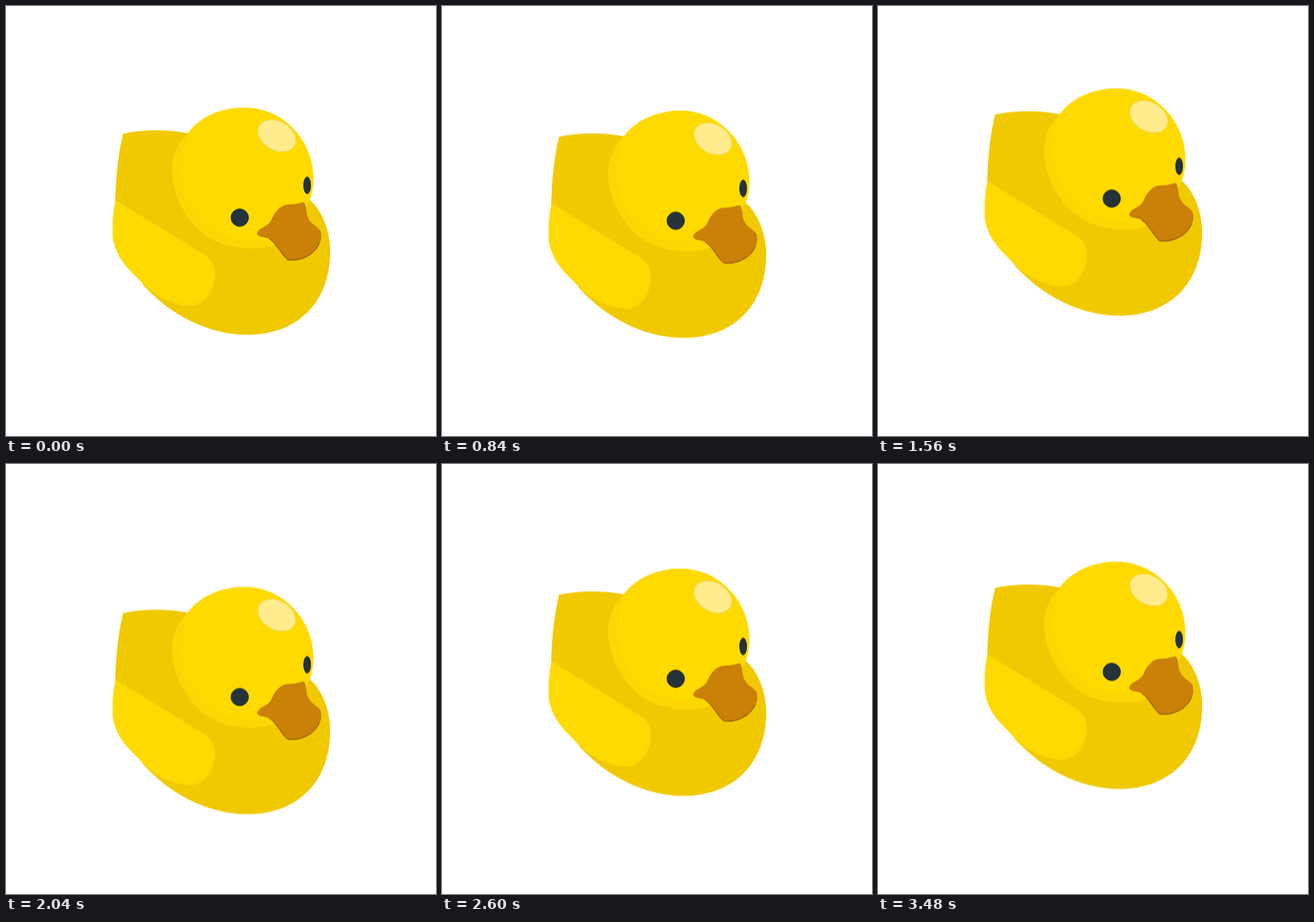
Recreate the animation shown at these times as an HTML page. Size 512 by 512 pixels, loop 3520 ms.

```html
<!DOCTYPE html>
<html lang="en">
<head>
<meta charset="utf-8">
<title>Bobbing duck</title>
<style>
  html, body { margin: 0; width: 100%; height: 100%; overflow: hidden; background: #fff; }
  svg { display: block; width: 100vw; height: 100vh; }
  .duck { animation: bob 1760ms steps(11) infinite; }
  .body { fill: #f0c900; }
  .rim { fill: #fbd803; }
  .light { fill: #ffda00; }
  .spot { fill: #ffec8c; stroke: #f3d650; stroke-width: .8; }
  .eye { fill: #25333b; stroke: #172126; stroke-width: 1; }
  .beak { fill: #cb8008; stroke: #c17507; stroke-width: 1; }
  .lip { fill: none; stroke: #80500f; stroke-width: .9; }

  /* straight-line bob, deeper on the way up */
  @keyframes bob {
    0%, 50%, 100% { transform: translateY(0); }
    25% { transform: translateY(40px); }
    75% { transform: translateY(-50px); }
  }
</style>
</head>
<body>
<svg viewBox="0 0 512 512">
  <g class="duck">
    <path class="body" d="M139.500 152 Q176 144.500 217 151.500 L362 231
      C376 243 386 268 386 292 C386 351 349 391.500 287 391.500
      C240 391 196 368 163 332 L130 234 Q131 186 139.500 152Z"/>
    <path class="rim" d="M130.500 231.500 L236 296 C246 302 249.500 311 249 322
      C247 342 236 355 222 357 C205 358 183 349 167 335 L149 316
      C138 305 127 289 127 269 Q127 246 130.500 231.500Z"/>
    <path class="light" d="M130.500 231.500 L236 296 C245 302 248 310 247.500 320
      C246 338 235 351 220 353 C203 354 182 346 166 333 L149 316
      C138 305 127 289 127 269 Q127 246 130.500 231.500Z"/>
    <path class="rim" d="M216 152.500 C231 131 258 121 284 121
      C330 121 366 160 366 206 Q366 224 357 240 L318 285
      C300 291 276 290 251 281 C219 266 197 228 197.500 193 Q199 168 216 152.500Z"/>
    <path class="light" d="M216 152.500 C231 131 258 121 284 121
      C330 121 366 160 366 206 C366 247 332 278 288 278
      C243 278 209 242 209 197 Q209 171 216 152.500Z"/>
    <ellipse class="spot" cx="322.500" cy="154.500" rx="24.200" ry="17.200" transform="rotate(30 322.500 154.500)"/>
    <circle class="eye" cx="278.300" cy="252" r="10.300"/>
    <ellipse class="eye" cx="358.600" cy="213.500" rx="4" ry="9.900"/>
    <path class="beak" d="M299.500 271 C301 264 311 264 316 256 C320 246 326 237 337 237
      C345 237 349 235 354.500 234 C358 240 356 248 360 254
      C364 261 371 263 374 268 C377 278 372 288 363 295
      C354 301 343 304 335 301.500 C328 296 324 285 315 278
      C309 273 301 276 299.500 271Z"/>
    <path class="lip" d="M314 277.500 C324 285 328 296 335 302 C345 304 354 301 363 295.500 Q370 290 373 283"/>
  </g>
</svg>
</body>
</html>
```
